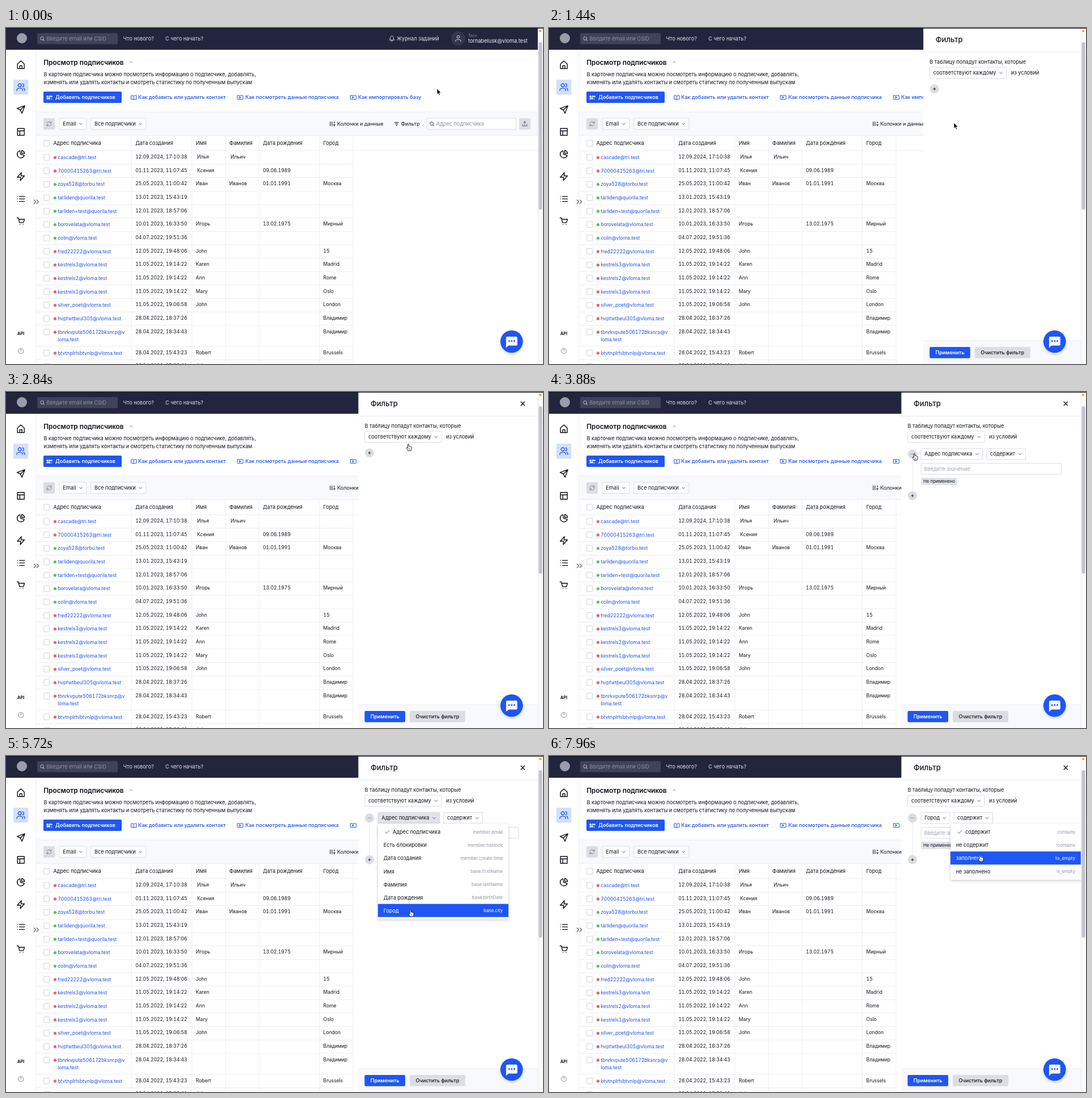
Animation of 947 by 592 pixels, one loop 8 s. Source, as an HTML page:

```html
<!DOCTYPE html>
<html lang="ru">
<head>
<meta charset="utf-8">
<style>
html, body { margin: 0; width: 100%; height: 100%; overflow: hidden; background: #fff; }
svg { display: block; width: 100vw; height: 100vh; font-family: Inter, Roboto, sans-serif; font-variant-numeric: tabular-nums; }
.on rect { fill: #1f56f4; }
.on text { fill: #fff; }
</style>
</head>
<body>
<svg id="stage" viewBox="0 0 947 592"></svg>
<script>
const INK = '#12141d', BLUE = '#1f56f4', LINK = '#1a50f0', LINE = '#e7e9f0', EDGE = '#d0d3dc', GREY = '#dcdde2';

const text = (x, y, s, size = 9.2, fill = INK, weight = 400, anchor = 'start') =>
  `<text x="${x}" y="${y}" font-size="${size}" fill="${fill}" font-weight="${weight}" text-anchor="${anchor}">${s}</text>`;
const rect = (x, y, w, h, fill, r = 0, stroke = 'none', attrs = '') =>
  `<rect x="${x}" y="${y}" width="${w}" height="${h}" rx="${r}" fill="${fill}" stroke="${stroke}" stroke-width=".8" ${attrs}/>`;
const circle = (x, y, r, fill, attrs = '') => `<circle cx="${x}" cy="${y}" r="${r}" fill="${fill}" ${attrs}/>`;
const icon = (x, y, d, color = INK, w = 1.1, fill = 'none') =>
  `<path transform="translate(${x} ${y})" d="${d}" fill="${fill}" stroke="${color}" stroke-width="${w}" stroke-linecap="round" stroke-linejoin="round"/>`;
const hline = (x1, x2, y, c = LINE) => rect(x1, y - .4, x2 - x1, .8, c);
const vline = (x, y1, y2, c = LINE) => rect(x - .4, y1, .8, y2 - y1, c);
const group = (id, body, attrs = '') => `<g id="${id}" ${attrs}>${body}</g>`;

const DOWN = 'M-2.4-1.1L0 1.3 2.4-1.1';
const LENS = 'M2.2 2.2L4 4M2.8 0A2.8 2.8 0 1 1-2.8 0 2.8 2.8 0 1 1 2.8 0';
const PLUS = 'M-2 0H2M0-2V2';

const dropdown = (x, y, w, label, id = '') =>
  `<g ${id && `id="${id}"`}>` + rect(x, y, w, 19.6, '#fff', 1.5, EDGE) +
  text(x + 6.3, y + 13, label) + icon(x + w - 9.8, y + 10, DOWN, '#444855', .9) + '</g>';

function topBar() {
  return rect(0, 0, 938, 38.4, '#23253f') +
    circle(28, 18, 9, '#9b9cab') +
    rect(55, 9, 142, 19.6, '#40425a', 2) + icon(63.6, 18.3, LENS, '#a9abba') +
    text(71.5, 22, 'Введите email или CSID', 9.2, '#8f91a3') +
    text(206.5, 22, 'Что нового?', 9.2, '#dfe0e8') + text(281, 22, 'С чего начать?', 9.2, '#dfe0e8') +
    icon(680.5, 18.5, 'M-4 2.5C-2.6 1-3-.5-2.8-2 -2.4-5.2 2.4-5.2 2.8-2 3-.5 2.6 1 4 2.5ZM-1 4.5H1', '#dfe0e8', 1) +
    text(689, 22, 'Журнал заданий', 9.2, '#dfe0e8') +
    circle(797.5, 18.3, 12.5, '#34364d') +
    icon(797.5, 18.3, 'M2.3-2.6A2.3 2.3 0 1 1-2.3-2.6 2.3 2.3 0 1 1 2.3-2.6M-4.6 5.4V4C-4.6 1.4 4.6 1.4 4.6 4V5.4', '#dfe0e8', 1) +
    text(815, 15.6, 'Тест', 7.2, '#8f91a3') + text(815, 26, 'tornabelusk@vloma.test', 9.2, '#eeeef4');
}

function sideBar() {
  const icons = [
    'M-6-1.5L0-7 6-1.5V6.5H-6ZM-2 6.5V1.5H2V6.5',
    'M1-3.4A2.9 2.9 0 1 1-4.8-3.4 2.9 2.9 0 1 1 1-3.4M-7 6V4.6C-7 .8 3.2.8 3.2 4.6V6M3-6.2C6-5.6 6-1.2 3-.6M5 1.8C6.6 2.4 7 3.6 7 6',
    'M7-6.8L-6.6-2 -.8.8 2 6.6ZM7-6.8L-.8.8',
    'M-6-6H6V6H-6ZM-6-1.8H6M-1.8-1.8V6',
    'M-1.5-6.3A6.4 6.4 0 1 0 6 2L-.5.2ZM1.5-6.6A6.5 6.5 0 0 1 6.6-1.4L1.5-1.4Z',
    'M1-7L-6.3 1.2H-.4L-1 7 6.3-1.2H.4Z',
    'M-2.5-4.5H6.5M-2.5 0H6.5M-2.5 4.5H6.5M-6-4.5H-5.8M-6 0H-5.8M-6 4.5H-5.8',
    'M-6.8-6H-4.4L-2.4 2.4H4.6L6.4-3.4H-3.7M-1.4 5.6H-1.3M3.8 5.6H3.9'
  ];
  return vline(53, 38.4, 592) + rect(13, 91, 26.4, 26.4, '#d3e0fb', 2) +
    icons.map((d, i) => icon(26.2, 65 + 39.35 * i, d, i == 1 ? BLUE : '#0b0d14', 1.4)).join('') +
    circle(53.4, 306, 10, '#fff', `stroke="${LINE}" stroke-width=".6"`) +
    icon(53.4, 306.2, 'M-4-3.4L-.6 0-4 3.4M.8-3.4L4.2 0 .8 3.4', '#4c505c', 1.2) +
    text(26.2, 540.6, 'API', 7.3, INK, 700, 'middle') +
    circle(26.2, 569, 4.6, 'none', 'stroke="#6c707c" stroke-width=".8"') +
    text(26.2, 571.4, '?', 6.6, '#6c707c', 500, 'middle');
}

function intro() {
  const video = x => icon(x, 122.3, 'M-4.4-3.4H4.4Q5-3.4 5-2.8V2.8Q5 3.4 4.4 3.4H-4.4Q-5 3.4-5 2.8V-2.8Q-5-3.4-4.4-3.4ZM-1.2-1.5L1.5 0-1.2 1.5Z', LINK, 1);
  const link = (x, s) => text(x, 125.4, s, 9.05, LINK, 500);
  return text(66.3, 64.7, 'Просмотр подписчиков', 11.84, '#0b0d14', 600) +
    icon(221, 60.3, 'M-2.4 1.1L0-1.3 2.4 1.1', '#7b7f8c', .9) +
    text(66.5, 85.3, 'В карточке подписчика можно посмотреть информацию о подписчике, добавлять,') +
    text(66.5, 98.5, 'изменять или удалять контакты и смотреть статистику по полученным выпускам') +
    rect(66, 112, 138, 20, BLUE, 2) +
    icon(76.5, 122, 'M-2-1.2A1.1 1.1 0 1 1-2-1.3M2-1.2A1.1 1.1 0 1 1 2-1.3M-4.5 3C-4.5 .8 .8.8.8 3ZM2.6 3H4M3-1.4H5M4-2.4V-.4M-5-1.4H-4.4', '#fff', 1.2) +
    text(87, 125.3, 'Добавить подписчиков', 9, '#fff', 600) +
    icon(225.3, 122.4, 'M0-2.6C-1.2-3.6-3-3.6-4.6-3.4V3.2C-3 3-1.2 3 0 4 1.2 3 3 3 4.6 3.2V-3.4C3-3.6 1.2-3.6 0-2.6V4', LINK, 1) +
    link(233, 'Как добавить или удалить контакт') +
    video(413) + link(422, 'Как посмотреть данные подписчика') +
    video(612.4) + link(621, 'Как импортировать базу');
}

function toolBar() {
  return rect(53.4, 148, 884.6, 41.5, '#f8f9fc') + hline(53, 938, 148) + hline(53, 938, 189.5) +
    rect(66, 159, 20, 20, GREY, 2) +
    icon(76, 168.9, 'M-4-.6C-3.4-4.2 1.6-5 3.6-1.6M3.8-4V-1.4H1.4M4 .6C3.4 4.2-1.6 5-3.6 1.6M-3.8 4V1.4H-1.4', '#747885', .9) +
    dropdown(94, 159, 47.6, 'Email') + dropdown(149.6, 159, 97.2, 'Все подписчики') +
    icon(576, 168.8, 'M-4.2-3.6V3.6M-1-3.6V3.6M3-3.6V-1.2M3 1.2V3.6M1.8 1.6H4.2', INK, 1.1) +
    text(584, 171.9, 'Колонки и данные', 9.15) +
    rect(679, 159, 57, 20, '#e6e7ec', 2, 'none', 'id="hover"') +
    icon(688.7, 168.8, 'M-3.6-2.6H3.6M-2.2 0H2.2M-.8 2.6H.8') + text(696.5, 171.9, 'Фильтр', 9.15) +
    rect(742.2, 159, 157.4, 19.6, '#fff', 1.5, EDGE) + icon(750.6, 168.4, LENS, '#555966') +
    text(758.8, 171.9, 'Адрес подписчика', 9.2, '#8b8f9c') +
    rect(905, 159, 20, 20, GREY, 2) +
    icon(914.8, 168.8, 'M0 1.6V-4M-2-2.2L0-4.2 2-2.2M-3.8 1V3.8H3.8V1', '#4c505c', .9);
}

const RED = '#ee625f', GREEN = '#52c956';
const rows = [
  ['cascade@tri.test', RED, '12.09.2024, 17:10:38', '\u00a0Илья', '\u00a0Ильич'],
  ['70000415263@tri.test', RED, '01.11.2023, 11:07:45', '\u00a0Ксения', '', '09.06.1989'],
  ['zoya528@torbu.test', GREEN, '25.05.2023, 11:00:42', 'Иван', 'Иванов', '01.01.1991', 'Москва'],
  ['tarliden@quorila.test', GREEN, '13.01.2023, 15:43:19'],
  ['tarliden+test@quorila.test', GREEN, '12.01.2023, 18:57:06'],
  ['borovelata@vloma.test', GREEN, '10.01.2023, 16:33:50', 'Игорь', '', '13.02.1975', 'Мирный'],
  ['colin@vloma.test', GREEN, '04.07.2022, 19:51:36'],
  ['fred22222@vloma.test', RED, '12.05.2022, 19:48:06', 'John', '', '', '15'],
  ['kestrels3@vloma.test', RED, '11.05.2022, 19:14:22', 'Karen', '', '', 'Madrid'],
  ['kestrels2@vloma.test', RED, '11.05.2022, 19:14:22', 'Ann', '', '', 'Rome'],
  ['kestrels1@vloma.test', RED, '11.05.2022, 19:14:22', 'Mary', '', '', 'Oslo'],
  ['silver_poet@vloma.test', RED, '11.05.2022, 19:06:58', 'John', '', '', 'London'],
  ['hvpfwtbeul305@vloma.test', RED, '28.04.2022, 18:37:26', '', '', '', 'Владимир'],
  ['tbnrkvpute506172bksnrp@v|loma.test', RED, '28.04.2022, 18:34:43', '', '', '', 'Владимир'],
  ['btvtnplrhibtvnlp@vloma.test', RED, '28.04.2022, 15:43:23', 'Robert', '', '', 'Brussels'],
  ['', 'none', '28.04.2022, 15:36:41', 'John']
];

function table() {
  const cols = [228.2, 334.8, 393.8, 453, 559.6];
  const heads = ['Дата создания', 'Имя', 'Фамилия', 'Дата рождения', 'Город'];
  const box = y => rect(66.6, y - 5.1, 10.2, 10.2, '#fff', 1.2, '#c3c7d2');
  let out = box(203) + text(83.5, 206.3, 'Адрес подписчика') +
    heads.map((s, i) => text(cols[i], 206.3, s)).join('') + hline(53, 938, 216.2);
  let y = 228;
  for (const [mail, dot, ...cells] of rows) {
    const lines = mail.split('|'), extra = 13.2 * (lines.length - 1);
    out += box(y) + circle(86.4, y + .3, 2.6, dot) +
      lines.map((s, i) => text(91.2, y + 3.1 + 13.2 * i, s, 8.55, LINK)).join('') +
      cells.map((s, i) => s ? text(cols[i], y + 2.1, s, 8.55) : '').join('') +
      hline(53, 612, y + extra + 12);
    y += 23.66 + extra;
  }
  return out + [221, 327.8, 387, 446.2, 552.6, 612].map(x => vline(x, 190, 592)).join('');
}

const MENU_TOP = 122, ITEM = 23.1;

function menu(id, x, items) {
  const w = 230;
  return group(id, rect(x, 119, w, items.length * ITEM + 6.5, '#fff', 1.5, 'none', 'filter="url(#soft)"') +
    items.map(([label, code], i) => {
      const y = MENU_TOP + ITEM * i;
      return `<g>${rect(x, y, w, ITEM, 'none')}` +
        (i ? '' : icon(x + 16.2, y + 11.8, 'M-3.4 0L-1 2.4 3.6-2.4', '#555966', .9)) +
        text(x + (i ? 9.7 : 26), y + 15.2, label) +
        text(x + w - 10, y + 14.7, code, 7.89, '#9093a0', 400, 'end') + '</g>';
    }).join(''));
}

function panel() {
  const node = (y, d) => circle(641, y, 8, GREY) + icon(641, y, d, '#1f222c', 1.1);
  const pair = (id, label, w, x2) => group(id, dropdown(656, 99.4, w, label, id + 'Box') + dropdown(x2, 99.4, 68.8, 'содержит'));
  return rect(621.4, 0, 317, 592, '#fff') + rect(621.4, 551, 317, 41, '#f8f9fc') +
    hline(621.4, 938, 42.4) + hline(621.4, 938, 551) +
    text(643, 25.3, 'Фильтр', 13, INK, 500) + icon(911.3, 20.5, 'M-3.2-3.2L3.2 3.2M3.2-3.2L-3.2 3.2', '#11131b', 1.4) +
    text(632.5, 63.2, 'В таблицу попадут контакты, которые') +
    dropdown(632.7, 69, 135.4, 'соответствуют каждому') + text(776, 82.2, 'из условий') +
    rect(632.4, 562, 71.6, 19.8, BLUE, 2) + text(668.3, 575, 'Применить', 9, '#fff', 600, 'middle') +
    rect(712, 562, 98, 19.8, GREY, 2) + text(760.9, 575, 'Очистить фильтр', 9, INK, 500, 'middle') +
    group('empty', node(107.3, PLUS)) +
    group('rule', vline(641, 117, 175, '#dcdfe7') + hline(649, 656, 109.3, '#dcdfe7') +
      node(109.3, 'M-2.6 0H-2.5M0 0H.1M2.6 0H2.7') + node(182.7, PLUS) +
      rect(656, 125.6, 248, 19.4, '#fff', 1.5, EDGE) + text(661.5, 138.6, 'Введите значение', 9.2, '#a3a6b1') +
      rect(656, 151, 63.6, 13, '#e2e4ea', 1) + text(660, 160.3, 'Не применено', 7.89) +
      pair('byMail', 'Адрес подписчика', 108.8, 771.6) + pair('byCity', 'Город', 51, 713.7)) +
    menu('fields', 656, [['Адрес подписчика', 'member.email'], ['Есть блокировки', 'member.haslock'],
      ['Дата создания', 'member.create.time'], ['Имя', 'base.firstName'], ['Фамилия', 'base.lastName'],
      ['Дата рождения', 'base.birthDate'], ['Город', 'base.city']]) +
    menu('ops', 708, [['содержит', 'contains'], ['не содержит', '!contains'],
      ['заполнено', '!is_empty'], ['не заполнено', 'is_empty']]);
}

const chat = circle(891.7, 552.5, 19.8, BLUE, 'filter="url(#soft)"') +
  icon(891.7, 552.5, 'M-8-8.8H8Q10-8.8 10-6.8V5Q10 7 8 7H-5.4L-9.8 10.8V-6.8Q-9.8-8.8-8-8.8Z', 'none', 0, '#fff') +
  [-4.6, 0, 4.6].map(d => circle(891.8 + d, 551.6, 1.5, BLUE)).join('');

const scroll = rect(938, 1, 9, 591, '#fafafb') + vline(938.2, 1, 592, '#e4e5e9') +
  rect(939.4, 25, 6.2, 295, '#c3c4cf', 3.1) + circle(942, 5.3, 2.1, '#f5a63a');

const pointers =
  group('arrow', icon(0, 0, 'M0 0V10L2.3 7.9 3.9 11.4 5.5 10.7 4 7.2H7Z', '#fff', .7, '#0b0b0d')) +
  group('hand', icon(0, 0, 'M-1 1C-1-.3 1-.3 1 1V4.2C1.6 3.6 2.6 3.8 2.8 4.6 3.4 4.1 4.3 4.4 4.4 5.2 5.2 4.8 6 5.3 6 6.2V8.4C6 9.6 5.2 10.2 5 12H-.4C-.8 10.4-2.6 8.6-3 7.2-3.2 6.2-2 5.8-1 7.2Z', '#0b0b0d', .9, '#fff') +
    icon(0, 0, 'M1.2 8V10M2.8 8V10', '#0b0b0d', .5));

document.getElementById('stage').innerHTML =
  '<defs><filter id="soft" x="-20%" y="-20%" width="140%" height="150%"><feDropShadow dx="0" dy="1.5" stdDeviation="2" flood-color="#1c2340" flood-opacity=".25"/></filter>' +
  '<clipPath id="page"><path d="M0 0H938V592H0Z"/></clipPath></defs>' +
  rect(0, 0, 947, 592, '#fff') +
  `<g clip-path="url(#page)">${topBar() + intro() + toolBar() + table() + sideBar() + group('panel', panel())}</g>` +
  chat + scroll + rect(0, 0, 947, 1, '#0c0d16') + group('cursor', pointers);

// Pointer path: time, x, y
const path = [
  [0, 760, 107], [200, 760, 107], [400, 756, 118], [600, 741, 141], [800, 722, 161], [1040, 714, 167],
  [1960, 714, 167], [2080, 690, 135], [2180, 650, 108], [2280, 700, 88], [2400, 752, 77],
  [2560, 752, 77], [2800, 720, 88], [3000, 668, 104], [3160, 641, 108],
  [3840, 641, 108], [3880, 644, 108], [4160, 700, 118], [4320, 735, 114], [4480, 741, 107],
  [5080, 741, 107], [5200, 724, 187], [5400, 717, 236], [5720, 713, 271],
  [6440, 713, 271], [6600, 722, 235], [6800, 752, 150], [7000, 764, 117], [7200, 764, 109],
  [7760, 764, 109], [7880, 763, 152], [7960, 760, 174], [8000, 760, 174]
];

const $ = id => document.getElementById(id);
const show = (id, on) => $(id).style.display = on ? '' : 'none';
const ramp = (t, a, b) => Math.min(1, Math.max(0, (t - a) / (b - a)));

function pointerAt(t) {
  const i = path.findIndex(p => p[0] > t), [a, x, y] = path[i - 1], [b, x2, y2] = path[i];
  const u = ramp(t, a, b);
  return [x + (x2 - x) * u, y + (y2 - y) * u];
}

function openMenu(id, on, y) {
  show(id, on);
  [...$(id).querySelectorAll('g')].forEach((g, i) =>
    g.setAttribute('class', Math.floor((y - MENU_TOP) / ITEM) == i ? 'on' : ''));
}

function render(t) {
  const [x, y] = pointerAt(t);
  $('cursor').setAttribute('transform', `translate(${x} ${y})`);
  show('arrow', t < 2320);
  show('hand', t >= 2320);

  $('hover').style.opacity = ramp(t, 840, 960) * (1 - ramp(t, 1120, 1240));
  show('panel', t >= 1320);
  $('panel').setAttribute('transform', `translate(${316 * (1 - ramp(t, 1280, 1600)) ** 3} 0)`);

  show('empty', t < 3320);
  show('rule', t >= 3320);
  show('byMail', t < 5960);
  show('byCity', t >= 5960);
  $('byMailBox').firstChild.setAttribute('fill', t >= 4680 ? '#e2e3e8' : '#fff');
  openMenu('fields', t >= 4680 && t < 6040, y);
  $('fields').style.opacity = t < 5960 ? 1 : .4;
  openMenu('ops', t >= 7320, y);
}

function tick() {
  render(performance.now() % 8000);
  requestAnimationFrame(tick);
}
tick();
</script>
</body>
</html>
```
